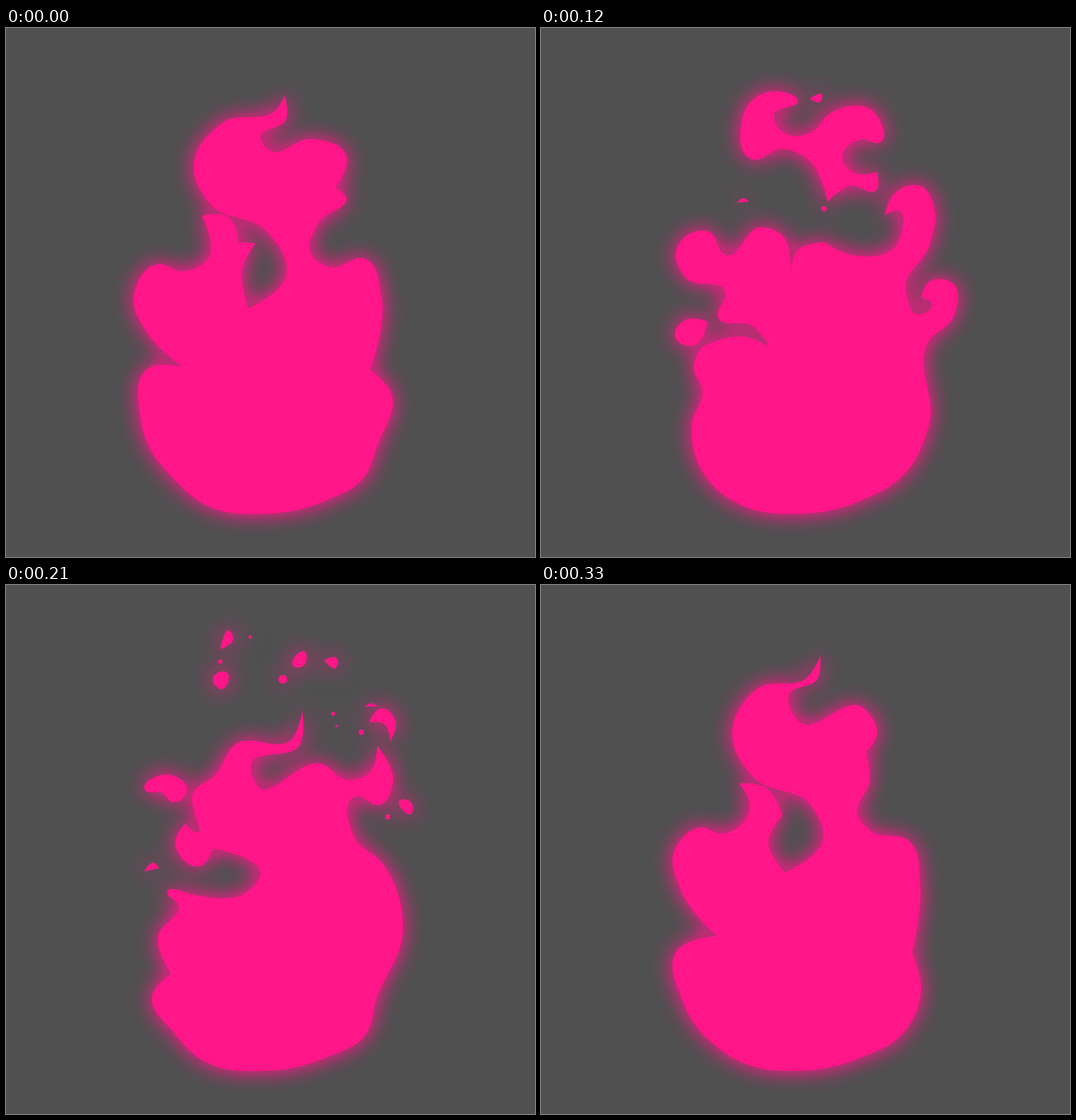
An HTML page that plays this animation: 600 by 600 pixels, repeating every 0.36 s.

```html
<!DOCTYPE html>
<html lang="en">
<head>
<meta charset="utf-8">
<title>Pink flame</title>
<style>
  html, body { margin: 0; width: 100%; height: 100%; overflow: hidden; background: #505050; }
  svg { display: block; width: 100vw; height: 100vh; }
  path { fill-rule: evenodd; }
  #younger { mix-blend-mode: screen; }
</style>
</head>
<body>
<svg viewBox="0 0 600 600">
  <defs>
    <filter id="glow" filterUnits="userSpaceOnUse" x="0" y="0" width="600" height="600" color-interpolation-filters="sRGB">
      <feGaussianBlur stdDeviation="12"/>
      <feComponentTransfer result="halo"><feFuncA type="table" tableValues="0 .3 .6 .6 .6"/></feComponentTransfer>
      <feMerge><feMergeNode in="halo"/><feMergeNode in="SourceGraphic"/></feMerge>
    </filter>
    <!-- Halfway shape: blur both outlines, keep where their sum passes one. -->
    <filter id="halfway" filterUnits="userSpaceOnUse" x="0" y="0" width="600" height="600" color-interpolation-filters="sRGB">
      <feGaussianBlur stdDeviation="7"/>
      <feColorMatrix values="0 0 0 0 1  0 0 0 0 .086  0 0 0 0 .537  12 12 0 0 -11.5"/>
    </filter>
  </defs>
  <g filter="url(#glow)">
    <path id="flame" fill="#ff1689"/>
    <g id="blend" filter="url(#halfway)">
      <rect width="600" height="600"/>
      <path id="older" fill="#f00"/>
      <path id="younger" fill="#0f0"/>
    </g>
  </g>
</svg>
<script>
const STEP = 30, STEPS = 12, RISE = 9;
const BOWL = '365,535 293,551 225,540';
const poses = [];

// Closed outlines: "x,y" is smooth, "x,y!" a corner, "~" the bowl; a lone "x,y,r" is a spark.
const pose = (step, ...parts) => poses.push({ step, parts });

pose(0, '316,76! 318,103 289,126 298,138 346,126 386,145 374,181! 385,190 354,222 346,256 366,271 408,262 426,305 413,388! 436,412 421,474 405,511 ~ 196,517 153,445 163,385 199,384! 162,348 145,305 172,268 199,276 230,260 222,213! 252,214 264,243! 283,244! 268,272 275,318! 318,280 296,231 232,200 213,158 245,108 308,91');

pose(2, '318,75! 314,102 294,100 280,116 298,133 345,112 383,115 384,144 357,158 374,179 389,171! 386,197 345,211 339,257 372,260 403,242 396,229! 418,217 440,243 416,331 442,348 437,440 416,502 ~ 190,513 178,441 166,420 171,398! 151,402 148,365 182,348 190,373 208,374 208,325 162,315 146,285 165,251 195,247 210,264 252,231! 268,232! 284,219 293,238! 270,243 280,300! 299,262 326,266 329,245 302,188 230,168 216,138 240,94 303,89',
  '217,206! 235,197 251,220! 233,206');

pose(4, '227,110 242,80 275,73 291,81 264,100 276,119 310,116 325,99 380,98 384,130 364,126 342,148 357,165 381,163! 381,183 350,179 325,197! 304,150 275,137 237,148',
  '305,80! 319,76 316,84', '321,205,3', '222,198! 230,193 236,197!',
  '390,213! 398,191 432,180 446,205 441,245 414,298 430,325 443,312 431,306! 440,288 466,289 468,327 440,355 440,450 412,506 ~ 190,513 171,450 183,410 173,385 183,361! 230,350 259,361! 240,338 201,328 209,300 164,283 154,250 190,231 209,257 250,226 272,234 284,281! 290,253 321,243! 354,258 405,243 403,207',
  '152,350 164,331 189,333! 174,360');

pose(5, '230,128 238,76 285,71 260,80 259,106 310,120 320,95 350,94 380,99 374,127 355,108 334,138 354,161 372,155! 373,170! 384,163! 372,181 354,171 322,183! 319,150 285,124',
  '314,80,1.6',
  '389,202! 396,173 413,166 424,144 443,170 441,235 408,278 417,312 452,298 440,286 427,298! 451,272 463,263 465,298 440,340 440,445 410,505 ~ 187,508 171,440 185,400 183,362! 268,356! 240,331 197,316 203,293! 213,290 200,270 160,267 158,236 198,229 209,249 250,211 268,223 299,212 282,265! 305,240 350,253 375,233 413,224 414,196',
  '158,346 162,323 187,330! 171,347');

pose(7, '336,142! 334,180 278,206 284,226 358,203 388,221 412,213 421,182! 439,222 425,249 396,240 394,284 428,317 450,392 420,470 408,510 ~ 190,507 166,465 187,441! 172,400 195,362 183,348 207,350! 270,350 288,330 235,299! 222,318 192,290 203,271! 214,280 213,234 236,217 260,181 325,174',
  '243,73! 254,52 258,60', '277,59,2', '243,87,2.5', '235,105 250,99 244,118',
  '326,92 339,76 335,93', '314,107,5', '361,85! 375,83 374,94', '371,146,2.3', '375,160,1.5',
  '407,138! 414,134 421,138!', '412,156! 425,140 442,155 436,177! 428,157', '403,167,3',
  '447,244 459,246 460,259', '433,263,3', '158,233 182,215 205,235 188,246 178,236', '157,325! 167,315 174,321!');

pose(9, '315,88! 325,118 293,148 273,185 299,195 355,158 383,190 374,250 432,355 428,435 414,497 ~ 200,525 152,440 188,420! 174,360 200,316 236,271! 258,327 291,335 310,300 237,264! 231,262! 223,210 262,152 308,125',
  '177,210 190,206 180,213', '168,218,1.2', '392,212! 407,194 412,206 405,203');

pose(11, '317,80! 314,106 281,126 292,154 366,140 381,170 369,189! 373,220 360,262 374,279 418,291 430,340 421,417! 431,460 408,511 ~ 205,528 160,470 154,415 199,398! 160,349 152,300 184,275 203,282 237,250 225,225! 254,229 274,261! 258,292 277,326! 320,288 308,252 240,217 217,170 245,118 303,104');

// The middle of the fire climbs; its tip and its base stay put.
const climb = (y, rise) => y - rise * Math.max(0, Math.sin(Math.PI * (y - 60) / 470));

function spark(text, rise) {
  const [x, y, r] = text.split(',').map(Number);
  return `M${x - r},${climb(y, rise)}a${r},${r} 0 1 0 ${2 * r},0a${r},${r} 0 1 0 ${-2 * r},0Z`;
}

// Smooth closed curve; each tangent is that of the circle through three neighbours.
function outline(text, rise) {
  const pts = text.replace('~', BOWL).split(' ').map(s => {
    const [x, y] = s.replace('!', '').split(',').map(Number);
    return { x, y: climb(y, rise), corner: s.endsWith('!') };
  });
  const at = i => pts[(i + pts.length) % pts.length];
  const gap = (a, b) => Math.hypot(b.x - a.x, b.y - a.y) || 1;
  const handle = (i, reach) => {
    const a = at(i - 1), p = at(i), b = at(i + 1);
    if (p.corner) return `${p.x},${p.y}`;
    const u = gap(a, p), v = gap(p, b);
    const tx = (p.x - a.x) * v / u + (b.x - p.x) * u / v;
    const ty = (p.y - a.y) * v / u + (b.y - p.y) * u / v;
    const k = reach / (Math.hypot(tx, ty) || 1);
    return `${(p.x + tx * k).toFixed(1)},${(p.y + ty * k).toFixed(1)}`;
  };
  let d = `M${pts[0].x},${pts[0].y}`;
  pts.forEach((p, i) => {
    const q = at(i + 1), reach = gap(p, q) * 0.36;
    d += `C${handle(i, reach)} ${handle(i + 1, -reach)} ${q.x},${q.y}`;
  });
  return d + 'Z';
}

const trace = ({ parts }, rise = 0) =>
  parts.map(p => (p.includes(' ') ? outline : spark)(p, rise)).join('');

const [flame, blend, older, younger] =
  ['flame', 'blend', 'older', 'younger'].map(id => document.getElementById(id));

function show(step) {
  const next = poses.findIndex(p => p.step >= step);
  const exact = poses[next].step === step;
  flame.style.display = exact ? '' : 'none';
  blend.style.display = exact ? 'none' : '';
  if (exact) {
    flame.setAttribute('d', trace(poses[next]));
  } else {
    older.setAttribute('d', trace(poses[next - 1], RISE));
    younger.setAttribute('d', trace(poses[next], -RISE));
  }
}

const start = performance.now();
let shown = -1;
function draw() {
  const step = Math.floor((performance.now() - start) / STEP) % STEPS;
  if (step !== shown) show(shown = step);
  requestAnimationFrame(draw);
}
draw();
</script>
</body>
</html>
```
